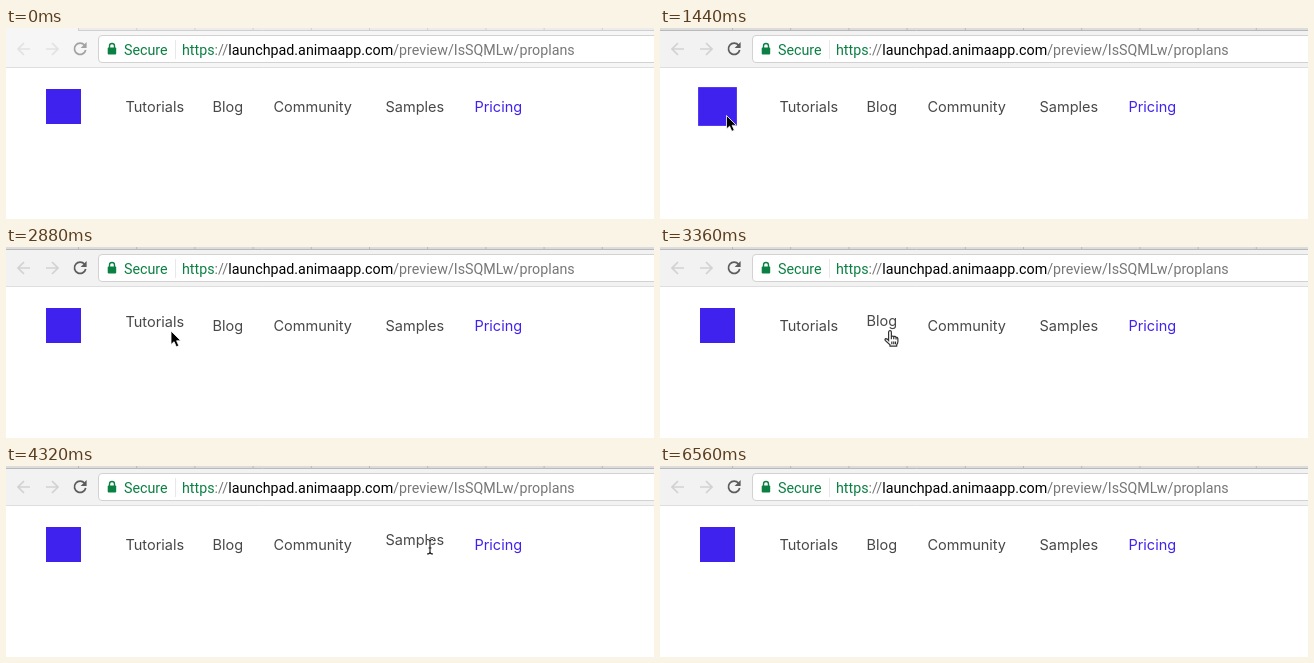
Write an HTML page that moves like this. It is 648 by 191 pixels and loops after 6640 ms.

```html
<!DOCTYPE html>
<html lang="en">
<head>
<meta charset="utf-8">
<title>Navigation hover</title>
<style>
  html, body { margin: 0; width: 100%; height: 100%; overflow: hidden; background: #fff; }
  svg { display: block; width: 648px; height: 191px; --bar: #f2f2f2; --strip: #dcdcdc; --edge: #b9b9b9; --arrow: #d2d2d2; --reload: #5c5c5c; }
  svg.inactive { --bar: #f6f6f6; --strip: #ececec; --edge: #d0d0d0; --arrow: #e2e2e2; --reload: #a2a2a2; }
  .bar { fill: var(--bar); }
  .strip { fill: var(--strip); }
  .edge { stroke: var(--edge); }
  .url { font: 14.28px Roboto, Arial, sans-serif; fill: #777; }
  .green { fill: #0b8043; }
  .host { fill: #000; }
  .nav { font: 400 14.5px Inter, "Open Sans", sans-serif; fill: #484848; }
  .nav .active { fill: #4022ee; }
  .icon { fill: none; stroke: var(--arrow); stroke-width: 1.7; }
  .reload { stroke: var(--reload); }
  .reload-tip { fill: var(--reload); }
</style>
</head>
<body>
<svg id="stage" viewBox="0 0 648 191">
  <defs>
    <path id="beamShape" d="M1 .5Q4 .5 4 2.5Q4 .5 7 .5M4 2.5V13M2.5 9H5.5M1 15q3 0 3-2q0 2 3 2"/>
  </defs>

  <rect class="bar" width="648" height="40"/>
  <rect class="strip" width="648" height="2"/>
  <path class="edge" d="M0 2.5H648"/>
  <path class="edge" d="M72 1H648" stroke-width="2" stroke-dasharray="1 57.2"/>
  <rect id="openTab" class="bar" width="72" height="3"/>
  <path d="M0 39.5H648" stroke="#dedede"/>

  <path class="icon" d="M24 21H12.5M18 15l-6 6 6 6M40 21H51.5M46 15l6 6-6 6"/>
  <path class="icon reload" d="M78.6 17.2A5.7 5.7 0 1 0 79.7 22"/>
  <path class="reload-tip" d="M80.6 14v6h-6z"/>

  <rect x="92.5" y="7.5" width="570" height="27" rx="3.5" fill="#fff" stroke="#d2d2d2"/>
  <rect class="green" x="101.7" y="19.5" width="8.5" height="7" rx="1"/>
  <path d="M103.5 20v-2a2.5 2.5 0 0 1 5 0v2" fill="none" stroke="#0b8043" stroke-width="1.4"/>
  <path d="M169.5 12V31" stroke="#e8e8e8"/>
  <g class="url">
    <text class="green" x="118" y="26.5">Secure</text>
    <text x="176" y="26.5"><tspan class="green">https</tspan>://<tspan class="host">launchpad.animaapp.com</tspan>/preview/IsSQMLw/proplans</text>
  </g>

  <rect id="logo" x="-17.5" y="-17.5" width="35" height="35" fill="#4022ee"/>
  <g id="nav" class="nav"></g>

  <g id="pointer">
    <path id="arrow" d="M0 0V13.5L3.1 10.7 5.3 15.8 7.8 14.8 5.6 9.8H9.8Z" fill="#000" stroke="#fff" stroke-width=".8"/>
    <path id="hand" transform="translate(-1 0) scale(.92)" d="M5 10V2.2a1.5 1.5 0 0 1 3 0V7q1-.9 2.6 0q1.8-.6 2.5.8q2 0 2 2.2v2.6q0 2-1.3 3.5v1.5H6.5v-1.6L1.3 11.3q-.7-1.7.8-2q1.4 0 2.9 2zM8 7v3M10.6 7.2V10M13.1 8v2.4M8.5 12.5v3M10.6 12.5v3M12.5 12.5v3" fill="#fff" stroke="#333" stroke-width="1.3"/>
    <g id="beam" fill="none">
      <use href="#beamShape" stroke="#fff" stroke-width="2.4"/>
      <use href="#beamShape" stroke="#222" stroke-width="1.2"/>
    </g>
  </g>
</svg>
<script>
const LOOP = 6640, STEP = 80, FADE = 300, LIFT = 5, FOCUS = 960;
const byId = id => document.getElementById(id);

// label, x, hover start, hover end
const items = [
  ["Tutorials", 119.5, 2080, 2800],
  ["Blog", 206.5, 3040, 3540],
  ["Community", 267.5, 3600, 3780],
  ["Samples", 379.5, 3920, 4690],
  ["Pricing", 468.5, 4740, 5130]
];
const logoHover = [1200, 1960];

// time, x, y, shape shown from that time on
const track = [
  [400, 343, 177, "arrow"],
  [560, 220, 140, "arrow"],
  [720, 104, 118, "arrow"],
  [1040, 104, 118, "arrow"],
  [1200, 84, 100, "arrow"],
  [1360, 66.5, 87.5, "arrow"],
  [1840, 66.5, 87.5, "arrow"],
  [2000, 84, 87, "arrow"],
  [2160, 126, 83, "hand"],
  [2320, 137, 79.5, "hand"],
  [2720, 137, 79.5, "hand"],
  [2880, 165, 84, "arrow"],
  [3040, 208, 85, "hand"],
  [3200, 225, 83, "hand"],
  [3440, 225, 83, "hand"],
  [3600, 252, 84, "arrow"],
  [3680, 285, 83, "hand"],
  [3840, 360, 81, "arrow"],
  [3920, 394, 78, "hand"],
  [4160, 420, 73, "beam"],
  [4560, 420, 73, "beam"],
  [4720, 452, 78, "arrow"],
  [4800, 474, 80, "hand"],
  [4960, 484, 80, "hand"],
  [5040, 484, 80, "hand"],
  [5120, 482, 88, "arrow"],
  [5280, 475.5, 103.5, "arrow"],
  [5520, 442, 145, "arrow"],
  [5760, 400, 184, "arrow"],
  [5840, 390, 195, null]
];

const labels = items.map(([label, x]) => {
  const text = document.createElementNS("http://www.w3.org/2000/svg", "text");
  text.textContent = label;
  text.setAttribute("x", x);
  if (label === "Pricing") text.setAttribute("class", "active");
  byId("nav").append(text);
  return text;
});

function ease(p) {
  p = Math.min(1, Math.max(0, p));
  return p * p * (3 - 2 * p);
}

const hover = (t, on, off) => ease((t - on) / FADE) - ease((t - off) / FADE);

function drawPointer(t) {
  const i = track.findLastIndex(key => key[0] <= t);
  const [start, x, y, shape] = track[i] || [0, 0, 0, null];
  for (const id of ["arrow", "hand", "beam"]) {
    byId(id).style.display = id === shape ? "" : "none";
  }
  if (!shape) return;
  const [end, nextX, nextY] = track[i + 1];
  const p = (t - start) / (end - start);
  byId("pointer").setAttribute("transform",
    `translate(${x + (nextX - x) * p} ${y + (nextY - y) * p})`);
}

function draw(now) {
  const t = Math.floor((now % LOOP) / STEP) * STEP;
  const inactive = t < FOCUS;
  byId("stage").classList.toggle("inactive", inactive);
  byId("openTab").style.display = inactive ? "" : "none";
  items.forEach(([, , on, off], i) => {
    labels[i].setAttribute("y", 84 - LIFT * hover(t, on, off));
  });
  const scale = 1 + 0.12 * hover(t, ...logoHover);
  byId("logo").setAttribute("transform", `translate(57.5 78.5) scale(${scale})`);
  drawPointer(t);
}

const origin = performance.now();
function tick() {
  draw(performance.now() - origin);
  requestAnimationFrame(tick);
}
tick();
</script>
</body>
</html>
```
